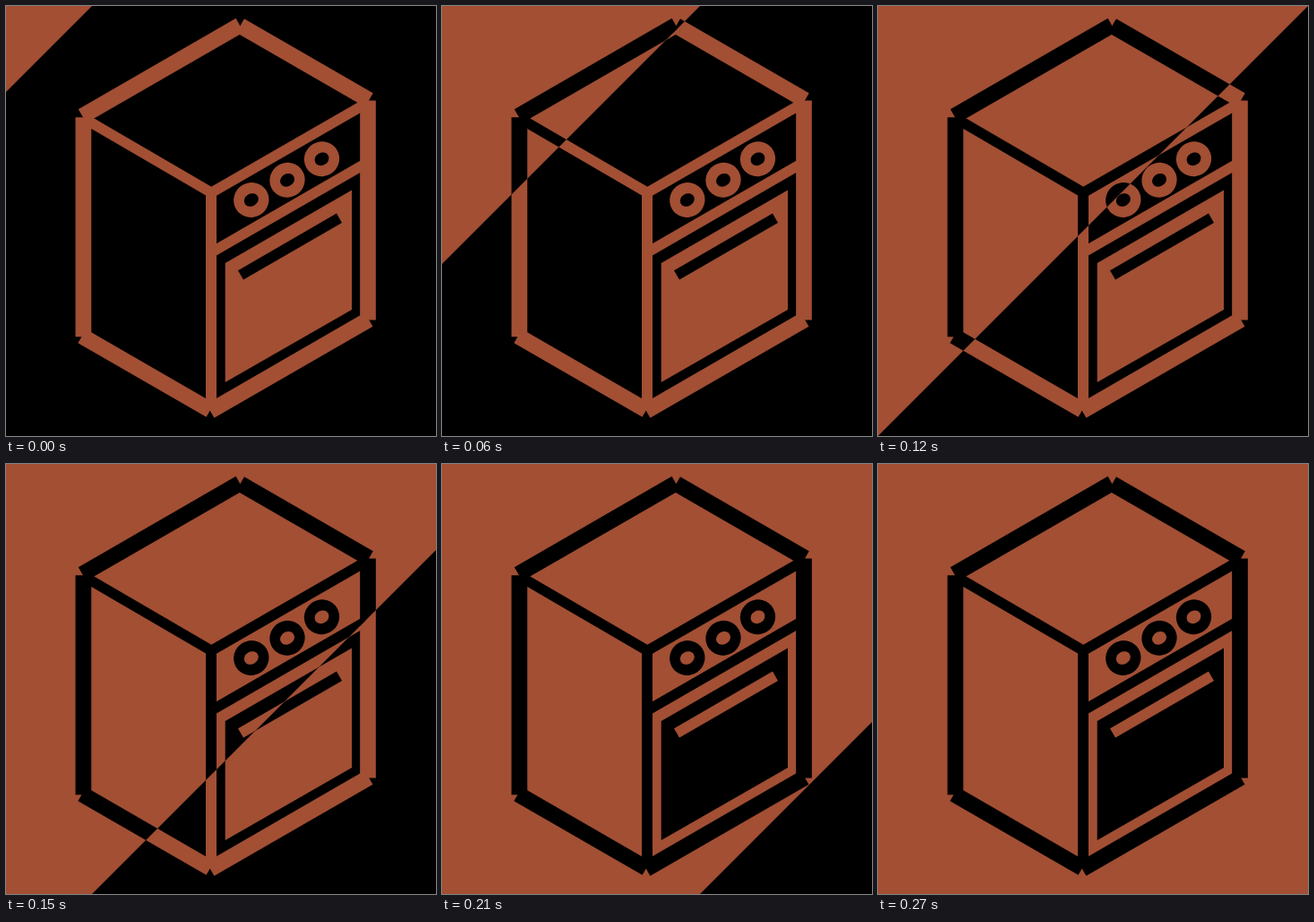
Animation of 480x480 px, one loop 300 ms. Source, as an HTML page with a canvas:

```html
<!DOCTYPE html>
<html lang="en">
<head>
<meta charset="utf-8">
<title>Oven wipe</title>
<style>
  html, body { margin: 0; width: 100%; height: 100%; overflow: hidden; background: #000; }
  canvas { display: block; width: 480px; height: 480px; }
</style>
</head>
<body>
<canvas id="stage" width="480" height="480"></canvas>
<script>
const ctx = document.getElementById('stage').getContext('2d');
const SIZE = 480;
const RUST = '#a24f34';
const BLACK = '#000';
const STEP_MS = 30;
const STEPS = 10;
const SWEEP = 2 * SIZE / STEPS;

function line(color, width, x1, y1, x2, y2) {
  ctx.strokeStyle = color;
  ctx.lineWidth = width;
  ctx.beginPath();
  ctx.moveTo(x1, y1);
  ctx.lineTo(x2, y2);
  ctx.stroke();
}

function polygon(...points) {
  ctx.beginPath();
  points.forEach(([x, y]) => ctx.lineTo(x, y));
  ctx.closePath();
}

function disc(color, x, y, rx, ry) {
  ctx.fillStyle = color;
  ctx.beginPath();
  ctx.ellipse(x, y, rx, ry, -Math.PI / 6, 0, 2 * Math.PI);
  ctx.fill();
}

function drawOven(ink, paper) {
  ctx.fillStyle = paper;
  ctx.fillRect(0, 0, SIZE, SIZE);

  const outer = (...ends) => line(ink, 17.7, ...ends);
  outer(86.4, 124.3, 86.4, 369.3);
  outer(404, 105.5, 404, 350.5);
  outer(85.2, 122.8, 261, 21.5);
  outer(261.5, 22, 405.3, 105);
  outer(84.8, 368.5, 228, 451.2);
  outer(228, 452.2, 405, 350);

  const inner = (...ends) => line(ink, 11.5, ...ends);
  inner(90, 127.3, 229, 208.3);
  inner(229, 208.5, 401, 109.5);
  inner(229, 275.2, 402, 175.6);
  line(ink, 12, 229, 208, 229, 448);

  for (const [x, y] of [[273.8, 216.5], [314, 194.3], [352.5, 170.8]]) {
    disc(ink, x, y, 19.8, 19.3);
    disc(paper, x, y, 8.3, 7);
  }

  ctx.fillStyle = ink;
  polygon([244.7, 287], [386, 205.5], [386, 339], [244.7, 420]);
  ctx.fill();
  line(paper, 12, 262, 300.4, 372, 236.7);
}

function frame(now) {
  const step = Math.floor(now / STEP_MS) % STEPS;
  const reach = SWEEP * (step + 1);

  drawOven(RUST, BLACK);
  // Swapped colours behind the diagonal edge x + y = reach.
  ctx.save();
  polygon([0, 0], [reach, 0], [0, reach]);
  ctx.clip();
  drawOven(BLACK, RUST);
  ctx.restore();

  requestAnimationFrame(frame);
}

frame(0);
</script>
</body>
</html>
```
